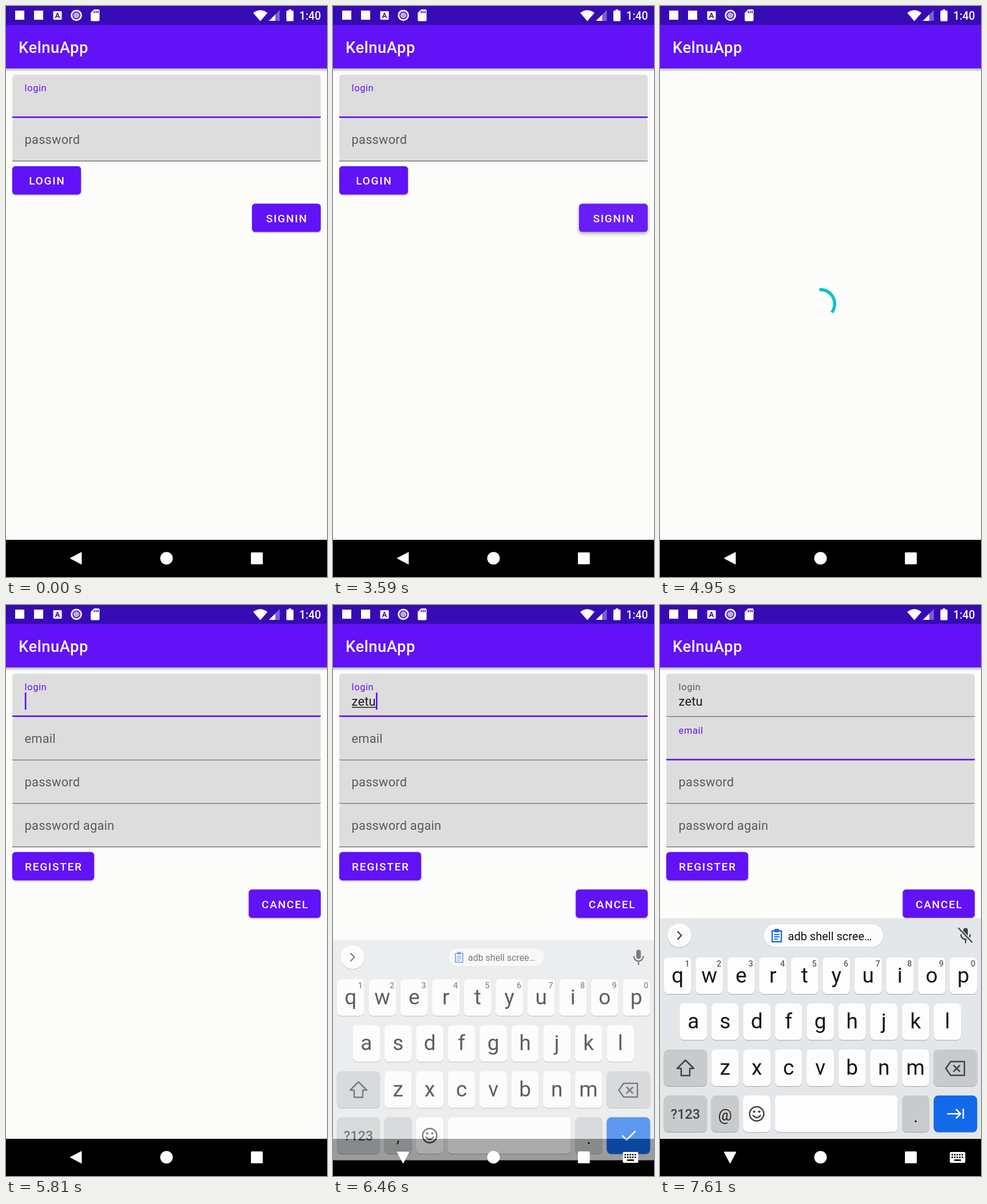
Write an HTML page that moves like this. It is 561x998 px and loops after 8 s.

```html
<!DOCTYPE html>
<html lang="en">
<head>
<meta charset="utf-8">
<title>Sign-up screen</title>
<style>
  html, body { margin: 0; width: 100%; height: 100%; overflow: hidden; background: #fcfcfb; }
  svg { display: block; width: 561px; height: 998px; }
  text { font-family: Roboto, sans-serif; white-space: pre; }
  .line { fill: none; stroke-linecap: round; stroke-linejoin: round; }
  .btn { filter: drop-shadow(0 1.5px 1.5px rgba(0, 0, 0, .35)); }
  .key { filter: drop-shadow(0 1.3px .5px rgba(0, 0, 0, .28)); }
</style>
</head>
<body>
<svg id="stage" viewBox="0 0 561 998"></svg>
<script>
const LOOP = 8000, TICK = 71.75;
const PURPLE = '#6112f6', GRAY = '#5a5a5a', INK = '#3f4246';
const TYPED = 'zetu';
const stage = document.getElementById('stage');
const $ = id => document.getElementById(id);
const clamp = v => Math.max(0, Math.min(1, v));
const mix = (a, b, p) => a + (b - a) * p;
const within = (k, ...spans) => spans.some(([a, b]) => k >= a && k < b);

// Markup helpers
const rect = (x, y, w, h, fill, r = 0, more = '') =>
  `<rect x="${x}" y="${y}" width="${w}" height="${h}" rx="${r}" fill="${fill}" ${more}/>`;
const circle = (x, y, r, fill, more = '') =>
  `<circle cx="${x}" cy="${y}" r="${r}" fill="${fill}" ${more}/>`;
const text = (x, y, size, str, fill, more = '') =>
  `<text x="${x}" y="${y}" font-size="${size}" fill="${fill}" ${more}>${str}</text>`;
const shape = (d, fill, more = '') => `<path d="${d}" fill="${fill}" ${more}/>`;
const line = (d, color, width, more = '') =>
  `<path class="line" d="${d}" stroke="${color}" stroke-width="${width}" ${more}/>`;
const group = (id, body, more = '') => `<g id="${id}" ${more}>${body}</g>`;
const MID = 'text-anchor="middle"', MEDIUM = 'font-weight="500"';

function button(id, x, y, w, label) {
  return group(id,
    rect(x, y, w, 49.4, PURPLE, 5.5) +
    text(x + w / 2 + .85, y + 32.2, 19.1, label, '#fff', `${MID} ${MEDIUM} letter-spacing="1.7"`),
    'class="btn"');
}

function field(id, y, label) {
  return shape(`M11 ${y + 75.5}V${y + 5.5}q0-5.5 5.5-5.5H544.5q5.5 0 5.5 5.5V${y + 75.5}z`, '#dedddd') +
    rect(11, y + 74, 539, 1.4, '#777', 0, `id="${id}Line"`) +
    text(32.6, y + 45, 21.8, label, GRAY, `id="${id}Label" letter-spacing=".01em"`);
}

function statusBar() {
  return rect(0, 0, 561, 33, '#370bb4') +
    rect(16, 8, 16, 16, '#fff') + rect(49, 8, 16, 16, '#fff') +
    rect(82.5, 9, 15, 15, '#fff', 1.5) +
    text(90, 21.2, 13, 'A', '#370bb4', `${MID} font-weight="700"`) +
    circle(123, 16.3, 8.4, '#370bb4', 'stroke="#f4f2fb" stroke-width="3"') +
    circle(123, 16.3, 5.4, '#b6a9e2') +
    shape('M154 6H161.5q2 0 2 2V24.5q0 2-2 2H150q-2 0-2-2V12z', '#fff') +
    [153.5, 156.8, 160].map(x => rect(x, 8.5, 1.7, 4, '#370bb4')).join('') +
    shape('M432 12Q444.500 2.500 457 12L444.500 26.500z', '#fff') +
    shape('M478.500 7V26H459.500z', '#fff', 'opacity=".35"') +
    shape('M470.500 15V26H459.500z', '#fff') +
    shape('M494 6h4.500v2h2.500q1.500 0 1.500 1.500V25q0 1.500-1.500 1.500h-9.500q-1.500 0-1.500-1.500V9.500q0-1.500 1.500-1.500h2.500z', '#fff') +
    text(512.5, 23.8, 19.3, '1:40', '#fff', MEDIUM);
}

function toolbar() {
  return rect(0, 109, 561, 6, 'url(#shade)') + rect(0, 33, 561, 76, PURPLE) +
    text(22, 81.5, 27.3, 'KelnuApp', '#fff', `${MEDIUM} letter-spacing=".6"`);
}

function key(x, y, w, label, opt = {}) {
  return rect(x, y, w, 64, opt.fill || '#fdfdfd', 8, 'class="key"') +
    (label ? text(x + w / 2, y + (opt.base || 43.5), opt.size || 37, label, opt.ink || '#141516', `${MID} ${opt.more || ''}`) : '');
}

function keyboard() {
  const SOFT = '#c8cacc', step = 55.5;
  const row = (chars, x, y) => [...chars].map((c, i) => key(x + i * step, y, 48, c)).join('');
  const digits = [...'1234567890'].map((d, i) =>
    text(47.5 + i * step, 632, 14.5, d, '#5c5f63', `${MID} ${MEDIUM}`)).join('');
  const mic = shape('M534 564.500a4 4 0 0 1 4 4v8a4 4 0 0 1-8 0v-8a4 4 0 0 1 4-4z', INK) +
    line('M526 576.500a8 8 0 0 0 16 0M534 585v5', INK, 2.4);
  const chip = rect(180.5, 557, 210.5, 41, '#fcfcfd', 20.5, 'stroke="#d3d6da" stroke-width="1.2"') +
    line('M196 569.500H212V588.500H196z', '#1a6be0', 2.3) +
    rect(200, 566, 8, 6, '#1a6be0', 1) +
    line('M200 576h8M200 580h8M200 584h5', '#1a6be0', 1.8) +
    text(223.5, 585.5, 20, 'adb shell scree…', '#111');
  return rect(0, 547.5, 561, 385, '#e4e7ea') +
    circle(34, 577.5, 20.8, '#fcfcfd', 'class="key"') + line('M31 571l6.500 6.500l-6.500 6.500', INK, 2.3) +
    group('chip', chip) + mic +
    group('micOff', line('M523 567L545 589', '#e4e7ea', 6) + line('M522 565L545 589', INK, 2.4)) +
    row('qwertyuiop', 6.7, 616) + digits +
    row('asdfghjkl', 34.2, 696.3) +
    key(6.7, 777, 75.5, '', { fill: SOFT }) +
    line('M44.500 795.500L59 810H52V822.500H37V810H30z', INK, 2.5) +
    row('zxcvbnm', 89.6, 777) +
    key(478.3, 777, 76, '', { fill: SOFT }) +
    line('M508 798H532V822H508L499.500 810zM513.500 805l10 10m0-10l-10 10', INK, 2.5) +
    key(6.7, 857.3, 75.5, '?123', { fill: SOFT, size: 23.5, base: 40.5, ink: INK, more: MEDIUM }) +
    key(89.6, 857.3, 48, '', { fill: SOFT }) +
    text(113.6, 901, 27, '@', '#222', `${MID} id="sideKey"`) +
    key(145.1, 857.3, 48, '') +
    circle(169, 889.3, 12.4, 'none', `stroke="${INK}" stroke-width="2.5"`) +
    circle(164.5, 885.5, 2, INK) + circle(173.500, 885.5, 2, INK) +
    line('M162.500 892q6.500 8 13 0', INK, 2.3) +
    key(200.5, 857.3, 215, '') +
    key(423, 857.3, 48, '.', { fill: SOFT, size: 29, base: 46.5 }) +
    key(478.3, 857.3, 76, '', { fill: '#1269ea' }) +
    group('check', line('M506 890l7 7l15-15', '#fff', 2.6)) +
    group('tab', line('M503 889.300h22M518 882l7.300 7.300l-7.300 7.300M530 881.500v15.500', '#fff', 2.6));
}

function navIcons() {
  const dots = [0, 1, 2, 3, 4].map(i =>
    rect(509.5 + i * 4.4, 959.5, 2.6, 2.6, '#000') + rect(509.5 + i * 4.4, 964, 2.6, 2.6, '#000')).join('');
  return group('back', shape('M113 965.300L131.500 955.500V975z', '#fff', 'stroke="#fff" stroke-width="1.8" stroke-linejoin="round"')) +
    circle(280.5, 965.3, 11, '#fff') + rect(428, 955, 20.8, 20.8, '#fff', 1.5) +
    group('imeKey', rect(506.5, 956, 27, 19, '#fff', 2) + dots + rect(514, 969, 12, 2.6, '#000'));
}

stage.innerHTML =
  `<defs><linearGradient id="shade" x2="0" y2="1">
     <stop stop-opacity=".3"/><stop offset="1" stop-opacity="0"/></linearGradient></defs>` +
  rect(0, 0, 561, 998, '#fcfcfb') +
  group('loginPage',
    field('name', 120.3, 'login') + field('pass', 196.2, 'password') +
    button('loginBtn', 11, 280, 120, 'LOGIN') + button('signBtn', 430, 345.4, 120, 'SIGNIN') +
    rect(430, 345.4, 120, 49.4, '#fff', 5.5, 'id="ripple"')) +
  group('loadPage', circle(280.5, 520.5, 24.8, 'none',
    'id="arc" stroke="#04c3ca" stroke-width="5.4" pathLength="360"')) +
  group('joinPage',
    field('joinName', 120.3, 'login') + field('mail', 196.2, 'email') +
    field('pass1', 272.1, 'password') + field('pass2', 348, 'password again') +
    button('registerBtn', 11, 431.8, 143, 'REGISTER') + button('cancelBtn', 424.3, 497.3, 125.7, 'CANCEL') +
    text(32.6, 176.3, 21.8, '', '#1b1b1b', 'id="typed" letter-spacing=".2"') +
    rect(33, 178, 0, 1.5, '#1b1b1b', 0, 'id="compose"')) +
  rect(32.8, 153, 2.7, 30, PURPLE, 0, 'id="cursor"') +
  toolbar() + statusBar() + rect(0, 933, 561, 65, '#000') +
  group('keyboard', keyboard()) + navIcons();

const set = (id, attrs) => { for (const a in attrs) $(id).setAttribute(a, attrs[a]); };
const show = (id, on) => { $(id).style.display = on ? '' : 'none'; };

// float: 0 = hint at rest, 1 = small label on top
function setField(id, y, float, focused) {
  set(id + 'Label', {
    y: mix(y + 45, y + 28.6, float),
    'font-size': mix(21.8, 16.4, float),
    'letter-spacing': mix(.01, .038, float) + 'em',
    fill: focused ? PURPLE : GRAY
  });
  const h = focused ? mix(1.4, 2.7, float) : 1.4;
  set(id + 'Line', { y: y + 75.4 - h, height: h, fill: focused ? PURPLE : '#777' });
}

// Inverts the trim curve (0,0) (.2,0) (.1,1) (.5,1)
function trim(p) {
  if (p <= 0) return 0;
  if (p >= .5) return 1;
  let lo = 0, hi = 1;
  for (let i = 0; i < 20; i++) {
    const s = (lo + hi) / 2, r = 1 - s;
    if (.6 * s * r * r + .3 * s * s * r + .5 * s ** 3 < p) lo = s; else hi = s;
  }
  return 3 * lo * lo - 2 * lo ** 3;
}

function spinner(ms) {
  const p = ((ms / 1333) % 1 + 1) % 1, tail = trim(p - .5);
  const start = .108 * ms + 90 * p + 270 * tail + 59;
  set('arc', {
    'stroke-dasharray': `${Math.max(2, 270 * (trim(p) - tail))} 360`,
    transform: `rotate(${start - 90} 280.5 520.5)`
  });
}

const SLIDE = [90, 38, 11, 3, 1, 0], FADE = [.25, .68, .92, 1, 1, 1];

function draw(k) {
  const joining = k >= 70, onMail = k >= 99;
  show('loginPage', k < 52);
  show('loadPage', k >= 52 && !joining);
  show('joinPage', joining);

  const lift = clamp((k - 46) / 3);
  $('signBtn').style.filter =
    `drop-shadow(0 ${mix(1.5, 3, lift)}px ${mix(1.5, 3, lift)}px rgba(0,0,0,.35))`;
  set('ripple', { opacity: .05 * lift });
  setField('name', 120.3, 1, true);
  spinner(k * TICK - 4048);

  setField('joinName', 120.3, clamp((k - 69.5) / 2.5), !onMail);
  setField('mail', 196.2, clamp((k - 98) / 3), onMail);
  const count = [85, 86, 88, 89].filter(at => k >= at).length;
  $('typed').textContent = TYPED.slice(0, count);
  const width = joining && count ? $('typed').getComputedTextLength() : 0;
  set('compose', { width: onMail ? 0 : width });

  show('cursor', within(k, [6, 13], [20, 27], [34, 41], [70, 74], [81, 106]));
  set('cursor', { x: 32.8 + (onMail ? 0 : width), y: onMail ? 229 : 153 });

  const i = Math.max(0, Math.min(5, k - 89));
  show('keyboard', k >= 89);
  set('keyboard', { transform: `translate(0 ${SLIDE[i]})`, opacity: FADE[i] });
  const pop = clamp((k - (onMail ? 100 : 90)) / 4);
  set('chip', {
    transform: `translate(285.7 577.5) scale(${mix(.8, 1, pop)}) translate(-285.7 -577.5)`,
    opacity: mix(.8, 1, pop)
  });
  show('micOff', onMail);
  show('tab', onMail);
  show('check', !onMail);
  $('sideKey').textContent = onMail ? '@' : ',';

  set('back', { transform: `rotate(${-90 * clamp((k - 84) / 2)} 122.5 965.3)` });
  show('imeKey', k >= 85);
}

let last = -1;
const begin = performance.now();
function frame() {
  const k = Math.floor(((performance.now() - begin) % LOOP) / TICK + .1);
  if (k !== last) draw(last = k);
  requestAnimationFrame(frame);
}
frame();
</script>
</body>
</html>
```
